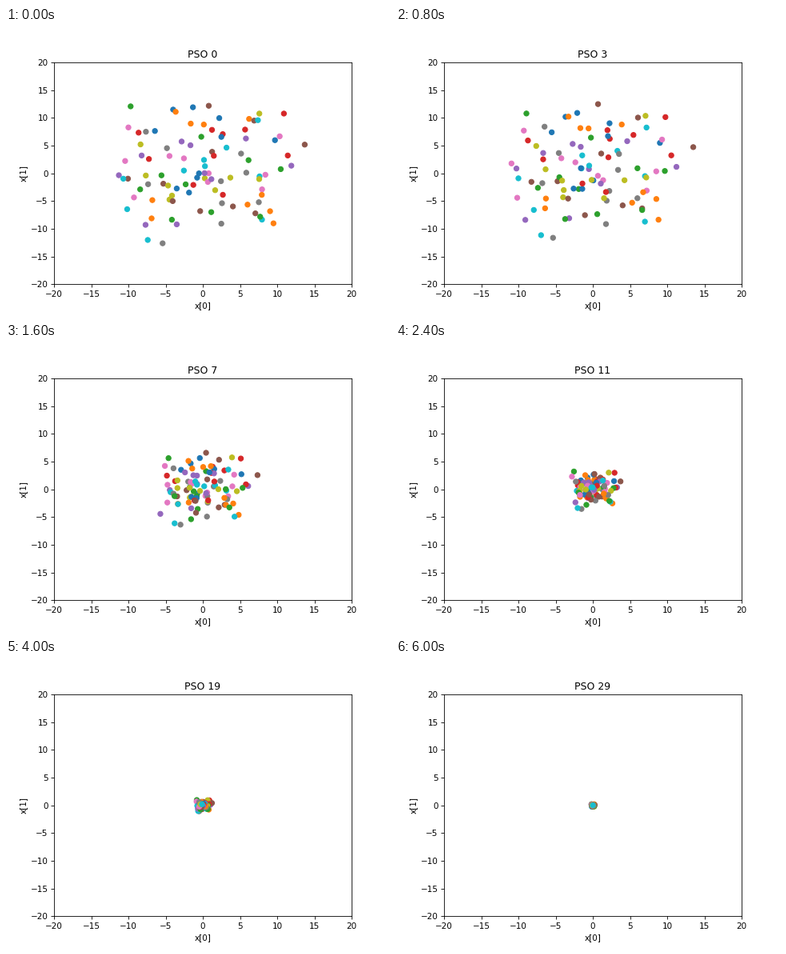
A matplotlib script for the animation above (6.2 s loop, 480 px wide and 360 px high).

```python
import matplotlib.pyplot as plt
import numpy as np
from matplotlib.animation import FuncAnimation

FRAMES, INTERVAL = 31, 200
COUNT, LIMIT = 100, 20

# The outermost particle of each colour; the rest of the swarm is random.
RIM = np.array([(9.7, 6.0), (9.5, -9.0), (-9.7, 12.1), (10.9, 10.8), (11.9, 1.4),
                (13.7, 5.2), (-10.0, 8.3), (-5.4, -12.6), (7.6, 10.8), (-7.4, -12.0)])

rng = np.random.default_rng(7)
rest = COUNT - len(RIM)
angle = rng.uniform(0, 2 * np.pi, rest)
radius = 12.5 * rng.uniform(0, 1, rest) ** 0.75
cloud = np.column_stack([radius * np.cos(angle), radius * np.sin(angle)])

start = np.vstack([RIM, cloud])
colors = [f"C{i % 10}" for i in range(COUNT)]
pull = np.append(np.ones(len(RIM)), rng.normal(1.25, 0.15, rest))
sway = rng.normal(0, 1, start.shape) * np.where(np.arange(COUNT) < len(RIM), 0.3, 1)[:, None]
phase = rng.uniform(0, 2 * np.pi, start.shape)


def positions(step):
    """Drift around for a moment, then fall exponentially into the centre."""
    shrink = np.exp(-0.15 * pull * max(0, step - 2.5))
    wander = sway * (np.sin(0.4 * step + phase) - np.sin(phase))
    return shrink[:, None] * (start + wander)


fig, ax = plt.subplots(figsize=(6.4, 4.8), dpi=75)
ticks = np.arange(-LIMIT, LIMIT + 1, 5)
ax.set(xlim=(-LIMIT, LIMIT), ylim=(-LIMIT, LIMIT), xticks=ticks, yticks=ticks,
       xlabel="x[0]", ylabel="x[1]")
title = ax.set_title("PSO 0")
swarm = ax.scatter(*start.T, c=colors)


def draw(frame):
    step = max(0, frame - 1)  # the first state is held twice
    swarm.set_offsets(positions(step))
    title.set_text(f"PSO {step}")
    return swarm, title


anim = FuncAnimation(fig, draw, frames=FRAMES, init_func=lambda: draw(0),
                     interval=INTERVAL, repeat=True, repeat_delay=0, blit=False)
plt.show()
```
